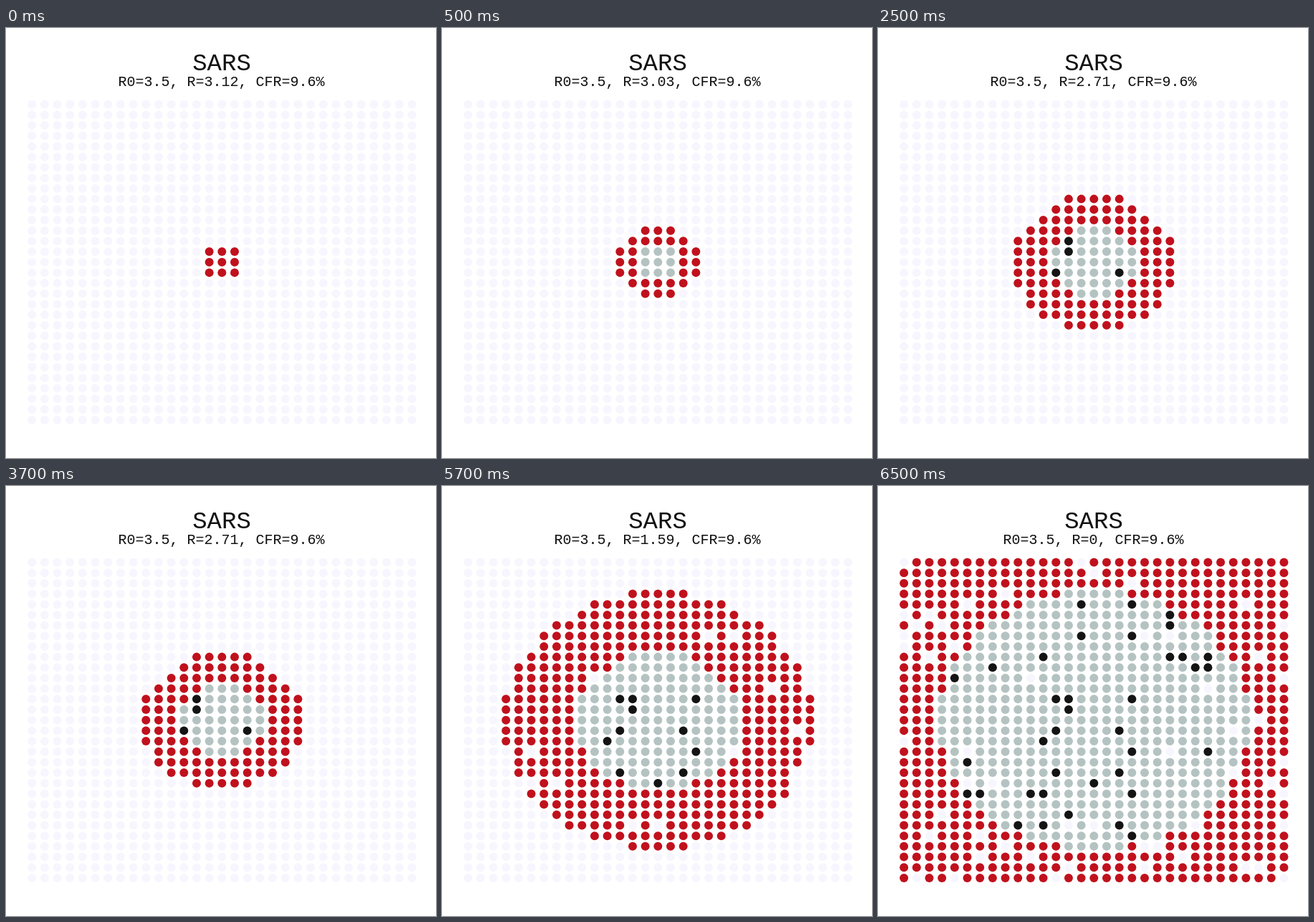
Recreate the animation shown at these times as an HTML page. Size 600 px wide and 600 px high, loop 8 s.

```html
<!DOCTYPE html>
<html lang="en">
<head>
<meta charset="utf-8">
<title>SARS outbreak</title>
<style>
  html, body { margin: 0; width: 100%; height: 100%; overflow: hidden; background: #fff; }
  svg { display: block; width: 100vw; height: 100vh; }
  text { font-family: "Courier New", Courier, "Liberation Mono", monospace; text-anchor: middle; fill: #111; }
</style>
</head>
<body>
<svg viewBox="0 0 600 600">
  <text x="301" y="59" font-size="34">SARS</text>
  <text id="stats" x="300.5" y="80.5" font-size="20"></text>
  <g id="grid"></g>
</svg>
<script>
const LOOP = 8000, SIZE = 31, MID = 15, FATALITY = 0.096;
const COLOR = { healthy: '#f7f6fe', ill: '#c0111d', recovered: '#b4c3c1', dead: '#141414' };

// start time, squared reach in cells, reproduction number, chance to escape infection
const STAGES = [
  { at: 0, reach: 2.5, r: 3.12, escape: 0 },
  { at: 500, reach: 10.5, r: 3.03, escape: 0 },
  { at: 2500, reach: 41, r: 2.71, escape: 0 },
  { at: 4500, reach: 149, r: 1.59, escape: 0.045 },
  { at: 6500, reach: Infinity, r: 0, escape: 0.085 }
];

function seeded(seed) {
  return () => {
    seed = (seed + 0x6d2b79f5) | 0;
    let n = Math.imul(seed ^ (seed >>> 15), 1 | seed);
    n = (n + Math.imul(n ^ (n >>> 7), 61 | n)) ^ n;
    return ((n ^ (n >>> 14)) >>> 0) / 2 ** 32;
  };
}

const random = seeded(7);
const grid = document.getElementById('grid');
const stats = document.getElementById('stats');
const people = [];

function addPerson(row, col) {
  const dot = document.createElementNS('http://www.w3.org/2000/svg', 'circle');
  dot.setAttribute('cx', 36.2 + col * 17.675);
  dot.setAttribute('cy', 106.5 + row * 14.68);
  dot.setAttribute('r', 6);
  grid.append(dot);
  // a slightly low centre settles ties on the rim
  const distance = (col - MID) ** 2 + (row - MID - 0.02) ** 2;
  const reached = STAGES.findIndex(s => distance <= s.reach);
  const escaped = random() < STAGES[reached].escape;
  const fatal = random() < FATALITY && reached > 0;
  people.push({ dot, caught: escaped ? Infinity : reached, fatal });
}

for (let row = 0; row < SIZE; row++) {
  for (let col = 0; col < SIZE; col++) addPerson(row, col);
}

function stateOf(person, stage) {
  if (stage < person.caught) return 'healthy';
  if (stage === person.caught) return 'ill';
  return person.fatal ? 'dead' : 'recovered';
}

let shown = -1;
function draw(time) {
  const stage = STAGES.filter(s => s.at <= time % LOOP).length - 1;
  if (stage === shown) return;
  shown = stage;
  stats.textContent = `R0=3.5, R=${STAGES[stage].r}, CFR=9.6%`;
  for (const p of people) p.dot.setAttribute('fill', COLOR[stateOf(p, stage)]);
}

const start = performance.now();
function tick() {
  draw(performance.now() - start);
  requestAnimationFrame(tick);
}
tick();
</script>
</body>
</html>
```
